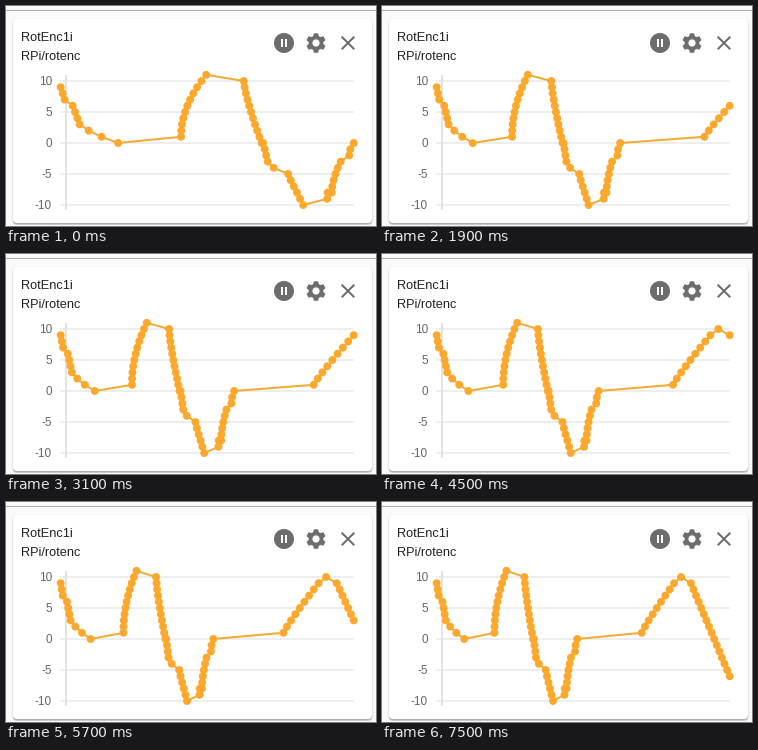
Write a matplotlib script that moves like this. It is 370 by 220 pixels and loops after 8000 ms.

```python
import numpy as np
import matplotlib.pyplot as plt
from matplotlib.animation import FuncAnimation
from matplotlib.patches import Circle, FancyBboxPatch, Polygon, Rectangle

W, H, DPI = 370, 220, 100
STEP, FRAMES = 100, 80
PX = 72 / DPI                       # points per pixel
LEFT, RIGHT = 54.7, 347.7           # plot area
ZERO, UNIT = 137, 6.2               # y of value 0, pixels per unit
ORANGE, LINE, ICON = "#fca82c", "#f3ac31", "#6c6c6c"

# Each turn of the knob: first value, last value, start, end, acceleration
TURNS = [
    (9, 7, 0, 4, 1), (6, 3, 12, 19, 1), (2, 0, 28, 57.5, 1.2),
    (1, 11, 120.3, 145.5, 2), (10, 0, 183, 201, 1.3),
    (0, -3, 202.5, 207, 1), (-4, -5, 213, 227.5, 1), (-6, -10, 230, 242.5, 1),
    (-9, -8, 266.5, 267, 1), (-8, -3, 271, 280, 1.7), (-2, 0, 288.5, 293, 2),
    (1, 9, 427.5, 495, 1.1), (10, 9, 509.5, 530, 1), (8, -6, 535.5, 611, 1),
]
LIVE, RATE = 427.5, 0.0257          # first new reading, time units per ms
TICK = 200                          # the chart refreshes on this beat

plt.rcParams["font.family"] = "Liberation Sans"


def run(first, last, start, end, power):
    """Readings one unit apart, spread over the given time."""
    s = np.linspace(0, 1, abs(last - first) + 1)
    return start + (end - start) * s ** power, first + (last - first) * s


times, values = (np.concatenate(part) for part in zip(*(run(*t) for t in TURNS)))
shown_at = 100 + TICK * np.ceil(((times - LIVE) / RATE + 230) / TICK)

fig = plt.figure(figsize=(W / DPI, H / DPI), dpi=DPI, facecolor="#fafafa")
ax = fig.add_axes([0, 0, 1, 1])
ax.set_xlim(0, W)
ax.set_ylim(H, 0)
ax.axis("off")


def stroke(xs, ys, color, width, cap="butt", **kw):
    return ax.plot(xs, ys, color=color, lw=width * PX, solid_capstyle=cap,
                   snap=False, **kw)[0]


def label(x, y, text, size, color, ha="left"):
    ax.text(x, y, text, fontsize=size * PX, color=color, ha=ha, va="baseline")


def rounded(x, y, w, h, r, color, alpha=1):
    ax.add_patch(FancyBboxPatch(
        (x, y), w, h, boxstyle=f"round,pad=0,rounding_size={r}",
        fc=color, ec="none", alpha=alpha))


def draw_card():
    stroke([0, W], [4.5, 4.5], "#ababab", 1)
    for grow, drop, alpha in [(1.5, 1, .03), (.7, 1, .06), (0, 1.2, .12), (0, 1.8, .12)]:
        rounded(7 - grow, 13 - grow + drop, 359 + 2 * grow, 204 + 2 * grow,
                4 + grow, "black", alpha)
    rounded(7, 13, 359, 204, 4, "white")
    label(14.9, 35.3, "RotEnc1i", 12.7, "#212121")
    label(14.9, 54.3, "RPi/rotenc", 12.7, "#212121")


def draw_pause(cx, cy):
    ax.add_patch(Circle((cx, cy), 10, fc=ICON, ec="none"))
    for dx in (-3, 1):
        ax.add_patch(Rectangle((cx + dx, cy - 4), 2, 8, fc="white", ec="none"))


def draw_gear(cx, cy):
    tooth = np.array([(-2.75, -6.95), (-2.35, -9.35), (-1.9, -9.7),
                      (1.9, -9.7), (2.35, -9.35), (2.75, -6.95)])
    outline = []
    for a in np.radians(np.arange(0, 360, 60)):
        turn = np.array([[np.cos(a), np.sin(a)], [-np.sin(a), np.cos(a)]])
        outline.extend(tooth @ turn + (cx, cy))
    ax.add_patch(Polygon(outline, fc=ICON, ec="none"))
    ax.add_patch(Circle((cx, cy), 3.6, fc="white", ec="none"))


def draw_close(cx, cy):
    for s in (-1, 1):
        stroke([cx - 6.3, cx + 6.3], [cy - 6.3 * s, cy + 6.3 * s], ICON, 2)


def draw_grid():
    for v in range(-10, 11, 5):
        y = ZERO - UNIT * v
        stroke([54, RIGHT], [y, y], "#e5e5e5", 1.3)
        label(46, y + 4.1, str(v), 11.8, "#666666", "right")
    stroke([60, 60], [69, 204], "#e0e0e0", 1.8)


draw_card()
draw_pause(278, 37)
draw_gear(310, 37)
draw_close(342, 37)
draw_grid()
curve = stroke([], [], LINE, 2, solid_joinstyle="round", zorder=5)
# Round-capped specks, because markers would jump to whole pixels
dots = stroke([], [], ORANGE, 8, cap="round", zorder=6)


def update(i):
    n = np.count_nonzero(shown_at <= i * STEP)
    # The time axis always ends at the newest reading
    xs = LEFT + times[:n] * (RIGHT - LEFT) / times[n - 1]
    ys = ZERO - UNIT * values[:n]
    curve.set_data(xs, ys)
    gap = np.full(n, np.nan)
    dots.set_data(np.column_stack([xs - .01, xs + .01, gap]).ravel(),
                  np.column_stack([ys, ys, gap]).ravel())
    return [curve, dots]


anim = FuncAnimation(fig, update, frames=FRAMES, interval=STEP,
                     repeat=True, repeat_delay=0, blit=False)
plt.show()
```
